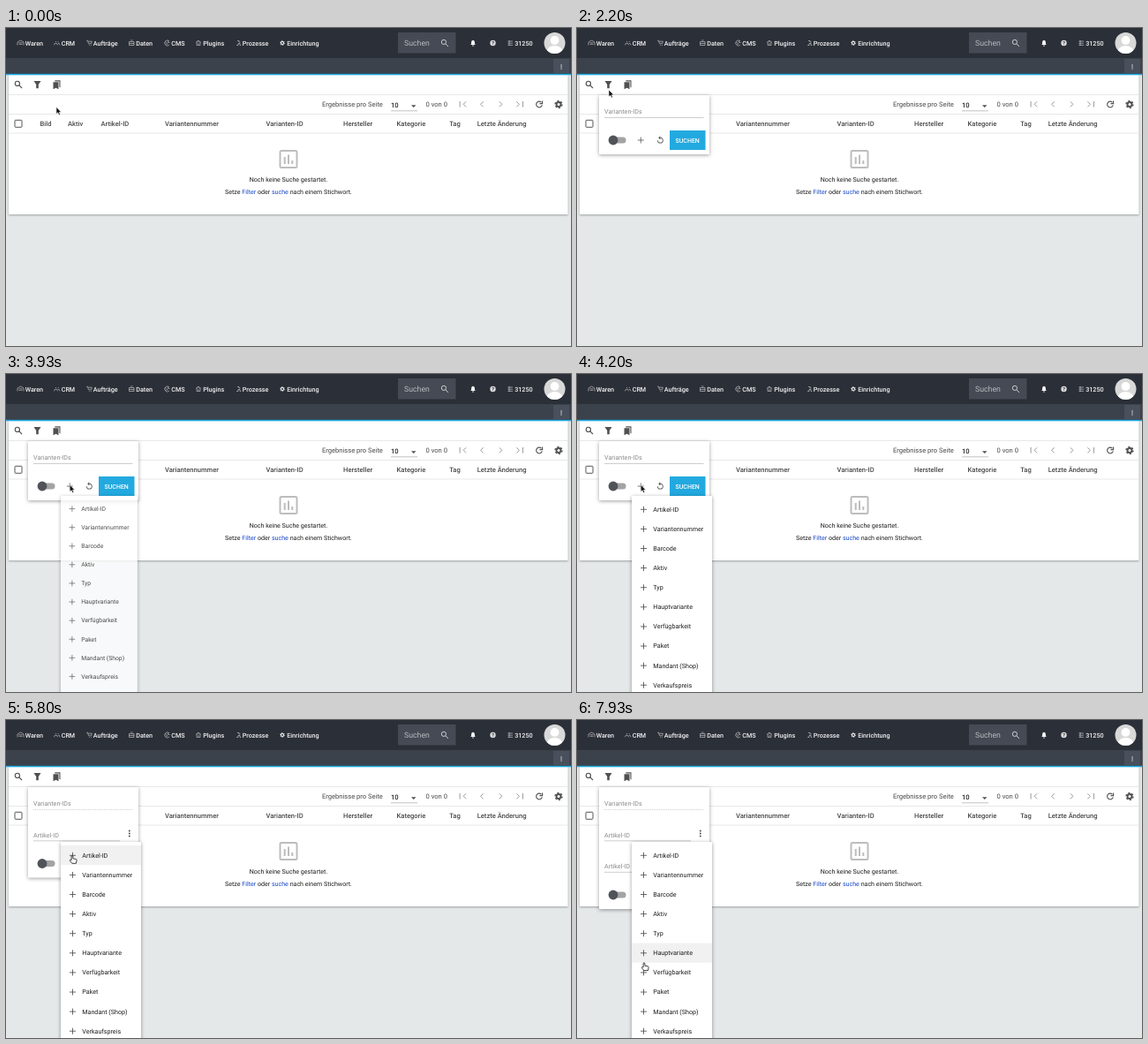
These frames come from a looping animation (640 by 360 pixels, 8000 ms). An HTML page:

```html
<!DOCTYPE html>
<html lang="de">
<head>
<meta charset="utf-8">
<style>
html, body { margin: 0; width: 100%; height: 100%; overflow: hidden; background: #e4e8e9; }
svg { display: block; width: 640px; height: 360px; font-family: Roboto, Arial, sans-serif; font-size: 7.15px; }
text { white-space: pre; text-rendering: geometricPrecision; }
.nav { font-size: 7.2px; font-weight: 500; fill: #f4f4f5; }
.head { font-size: 7.58px; font-weight: 500; fill: #484848; }
.label { fill: #8a8a8a; }
.line { fill: none; stroke: currentColor; }
.link { fill: #1646c8; }
.shadow { filter: drop-shadow(0 1px 2px rgba(0, 0, 0, .38)); }
</style>
</head>
<body>
<svg viewBox="0 0 640 360">
  <defs>
    <g id="search" class="line"><circle cx="-1.1" cy="-1.1" r="2.6"/><path d="M.9 .9L4 4"/></g>
    <path id="plus" class="line" d="M-3.5 0H3.5M0-3.5V3.5" stroke-width=".8"/>
    <g id="dots" fill="currentColor"><circle cy="-3" r=".9"/><circle r=".9"/><circle cy="3" r=".9"/></g>
    <g id="gear" class="line"><circle r="2.5" stroke-width="1.9"/><circle r="4" stroke-width="1.3" stroke-dasharray="2.09 2.09"/></g>
    <path id="turn" class="line" d="M2.4-2.4A3.4 3.4 0 1 0 3.3 .9M3.6-4V-.9H.5"/>
    <path id="chevron" class="line" d="M1.6-3L-1.4 0L1.6 3"/>
    <path id="end" class="line" d="M3.6-3L.6 0L3.6 3M-3.4-3.3V3.3"/>
  </defs>

  <!-- top bars -->
  <rect width="640" height="34" fill="#2b2f37"/>
  <rect y="34" width="640" height="18" fill="#3c424c"/>
  <rect x="620" y="35" width="18" height="16" fill="#4a505b"/>
  <use href="#dots" transform="translate(629 44) scale(.7)" color="#fff"/>
  <g id="nav"></g>
  <g color="#fff" class="line" stroke-width=".6" opacity=".8">
    <path d="M13 19.5V16L16.5 14L20 16V19.5M14.7 16.8H18.5M14.7 18.4H18.5"/>
    <path d="M54.5 19.3Q54.5 17.2 56.5 17.2T58.5 19.3M59 17.2Q61 17.2 61 19.3M56.5 15V16M59.2 15V16"/>
    <path d="M91 14.2H92.4L93.5 17.8H96.500L97.300 15.2H93M94 19.6H94.8M96 19.6H96.800"/>
    <path d="M139.5 19.5V15.5H145V19.5ZM139.5 17.5H145M141 14H143.5"/>
    <path d="M185 15A3 3 0 1 0 185 19M180.500 16Q183.500 17 182 19M183.500 14.5V16.5H185.5"/>
    <path d="M215 16H217V14.5H218.8V16H221M216 16.5V19.5H220V16.5M217 18H219"/>
    <path d="M262 14.5H264V16H265.500M261 19.5H263V17.5H265V19.5H266.300"/>
    <path d="M568.5 15H574M568.5 17.2H574M568.5 19.4H574M570 14V20"/>
  </g>
  <use href="#gear" transform="translate(313 17) scale(.62)" color="#e8e8e8"/>
  <rect x="444" y="5" width="65.500" height="23.500" fill="#454a54"/>
  <text x="451" y="20" font-size="8.75" fill="#b8bbc0">Suchen</text>
  <use href="#search" transform="translate(497 17)" color="#c8cace" stroke-width="1"/>
  <path d="M526.300 19H531.700L530.900 17.800V16Q530.900 13.900 529 13.700Q527.100 13.900 527.100 16V17.800ZM528.200 19.600H529.800V20.400H528.200Z" fill="#fff"/>
  <circle cx="551.500" cy="17" r="3.200" fill="#dcdcde"/>
  <text x="551.500" y="19" text-anchor="middle" font-size="5.500" font-weight="700" fill="#2b2f37">?</text>
  <clipPath id="disc"><circle cx="621.500" cy="17" r="12"/></clipPath>
  <g clip-path="url(#disc)">
    <rect x="609" y="5" width="25" height="25" fill="#d8d8d8"/>
    <circle cx="621.500" cy="14" r="4.900" fill="#fff"/>
    <ellipse cx="621.500" cy="27" rx="9" ry="7" fill="#fff"/>
  </g>

  <!-- result card -->
  <rect x="3" y="53" width="633.500" height="158" fill="#fff" style="filter: drop-shadow(0 1px 1px rgba(0,0,0,.3))"/>
  <rect y="51.800" width="640" height="1.500" fill="#1ba8e0"/>
  <path d="M3 75.500H636.500M3 97.500H636.500M3 119H636.500" class="line" color="#e2e2e2" stroke-width=".8"/>
  <g color="#505050" fill="#505050">
    <use href="#search" x="14" y="64" stroke-width="1.100"/>
    <path d="M31.500 60H39.500L36.800 64V68.300H34.200V64Z"/>
    <path d="M53.500 61.300H59.500V69.300L56.500 67.800L53.500 69.300ZM55.300 59.300H61.500V67.500L60.400 66.800V60.400H55.300Z"/>
    <use href="#turn" x="604" y="86.500" stroke-width="1.100"/>
    <use href="#gear" x="626" y="86.500"/>
    <path d="M459 87.300H464.500L461.750 90Z"/>
  </g>
  <path d="M436 93.800H466" class="line" color="#aaa" stroke-width=".7"/>
  <g color="#999" stroke-width="1">
    <use href="#end" x="517.500" y="86.300"/>
    <use href="#chevron" x="539" y="86.300"/>
    <use href="#chevron" transform="translate(560.500 86.300) scale(-1 1)"/>
    <use href="#end" transform="translate(582 86.300) scale(-1 1)"/>
  </g>
  <g class="head" style="font-weight:400">
    <text x="358" y="89">Ergebnisse pro Seite</text>
    <text x="436" y="89.700" font-weight="500" fill="#222">10</text>
    <text x="475.500" y="89">0 von 0</text>
  </g>
  <rect x="10" y="104.300" width="8" height="8" rx=".8" class="line" color="#555"/>
  <g id="head"></g>
  <g class="line" color="#bdbdbd" stroke-width="2">
    <rect x="310.500" y="139" width="19" height="19" rx="1.500"/>
    <path d="M315.700 146V154M320 143.500V154M324.300 150V154"/>
  </g>
  <g text-anchor="middle" fill="#1c1c1c" font-size="7.100">
    <text x="320" y="174">Noch keine Suche gestartet.</text>
    <text x="320" y="188.400">Setze <tspan class="link">Filter</tspan> oder <tspan class="link">suche</tspan> nach einem Stichwort.</text>
  </g>

  <g id="tip">
    <rect x="24" y="33" width="23" height="15" rx="1" fill="#24272d"/>
    <text x="35.500" y="43" text-anchor="middle" font-size="6.600" fill="#fff">Filter</text>
  </g>

  <!-- filter panel -->
  <g id="panel">
    <rect id="sheet" x="25" y="76" width="125" height="67" rx="1" fill="#fff" class="shadow"/>
    <text x="31" y="97.300" class="label">Varianten-IDs</text>
    <path id="idLine" d="M31 101.500H143.500" class="line" color="#c0c0c0" stroke-width=".8"/>
    <g id="fields"></g>
    <g id="actions">
      <rect x="38" y="123.500" width="17.500" height="7" rx="3.500" fill="#a3a3a3"/>
      <circle cx="41" cy="127" r="5.400" fill="#505359"/>
      <use href="#plus" x="72.300" y="127" color="#555"/>
      <path d="M12 5V1L7 6l5 5V7a6 6 0 1 1-6 6H4a8 8 0 1 0 8-8z" transform="translate(89.300 121.800) scale(.42)" fill="#505050"/>
      <rect x="105" y="116" width="40.500" height="22" fill="#22a9df"/>
      <text x="125.200" y="129.600" text-anchor="middle" font-size="7" font-weight="500" fill="#fff">SUCHEN</text>
    </g>
  </g>

  <g id="menu">
    <rect x="62" y="138" width="91" height="240" fill="#fff" class="shadow"/>
    <rect id="hover" x="62" width="91" height="22.100" fill="#f1f1f1"/>
    <g id="items"></g>
  </g>

  <path id="arrow" d="M0 0V7.800L1.800 6.200L3.100 9L4.400 8.400L3.200 5.700H5.500Z" fill="#111" stroke="#fff" stroke-width=".5"/>
  <path id="hand" d="M-.9 5.500V.7Q0-.4 .9 .7V3.600L4.300 4.200Q5.200 4.500 5.100 5.600L4.400 9H-.2L-2.700 5.900Q-2.600 4.700-1.600 5Z" fill="#fff" stroke="#111" stroke-width=".8" stroke-linejoin="round"/>
</svg>
<script>
const $ = id => document.getElementById(id);
const LOOP = 8000, STEP = 200 / 3, ROW = 22.1, TOP = 142, GROW = 35.5;

const labels = (id, cls, y, list) => {
  $(id).innerHTML = list.map(([x, s]) => `<text class="${cls}" x="${x}" y="${y}">${s}</text>`).join("");
};
labels("nav", "nav", 19.5, [[21.7, "Waren"], [62.7, "CRM"], [98.7, "Aufträge"], [147.2, "Daten"], [187.2, "CMS"],
  [223.2, "Plugins"], [267.7, "Prozesse"], [318.2, "Einrichtung"], [576.2, "31250"]]);
labels("head", "head", 110.8, [[38.5, "Bild"], [70, "Aktiv"], [107.5, "Artikel-ID"], [180, "Variantennummer"],
  [294.5, "Varianten-ID"], [382, "Hersteller"], [442.5, "Kategorie"], [502.3, "Tag"], [533.7, "Letzte Änderung"]]);

$("items").innerHTML = ["Artikel-ID", "Variantennummer", "Barcode", "Aktiv", "Typ", "Hauptvariante",
  "Verfügbarkeit", "Paket", "Mandant (Shop)", "Verkaufspreis"].map((s, i) => {
  const y = 153.3 + i * ROW;
  return `<use href="#plus" x="75.500" y="${y}" color="#444"/><text x="86.300" y="${y + 2.4}" fill="#1c1c1c">${s}</text>`;
}).join("");

$("fields").innerHTML = [0, 1].map(i => `<g transform="translate(0 ${i * GROW})">
  <text x="31" y="132.500" class="label">Artikel-ID</text>
  <path d="M31 136.800H129" class="line" color="#c0c0c0" stroke-width=".8"/>
  <use href="#dots" x="139.800" y="128.500" color="#444"/></g>`).join("");

// cursor tip: time, x, y
const path = [[1000, 57, 89.5], [1470, 37.5, 73.5], [1600, 36, 71.8], [1800, 36, 70], [2665, 36, 70],
  [3000, 62, 92], [3330, 71, 114.3], [3530, 72.3, 125.5], [4665, 72.3, 125.5], [5070, 75, 153.3],
  [7200, 75, 153.3], [7270, 74.6, 157.3], [7930, 76, 274.4], [8000, 76, 278]];

const ramp = (t, from, dur) => {
  const k = Math.min(1, Math.max(0, (t - from) / dur));
  return 1 - (1 - k) ** 2;
};

function cursor(t) {
  const i = path.findIndex(p => p[0] > t);
  if (i <= 0) return path[0].slice(1);
  const [t0, x0, y0] = path[i - 1], [t1, x1, y1] = path[i], k = (t - t0) / (t1 - t0);
  return [x0 + (x1 - x0) * k, y0 + (y1 - y0) * k];
}

function pop(id, k, x, y) {
  const s = .8 + .2 * k;
  $(id).setAttribute("opacity", k);
  $(id).setAttribute("transform", `translate(${x * (1 - s)} ${y * (1 - s)}) scale(${s})`);
}

function draw(now) {
  const t = Math.floor((now % LOOP) / STEP + .05) * STEP + 1;
  const [x, y] = cursor(t);
  const pointing = (t > 1330 && t < 2130) || (t > 3595 && t < 3865) || (t > 4665 && y > TOP);
  $("arrow").setAttribute("visibility", pointing ? "hidden" : "visible");
  $("hand").setAttribute("visibility", pointing ? "visible" : "hidden");
  for (const id of ["arrow", "hand"]) $(id).setAttribute("transform", `translate(${x} ${y})`);

  $("tip").setAttribute("opacity", ramp(t, 1400, 150) * (1 - ramp(t, 1990, 130)));
  pop("panel", ramp(t, 1960, 200), 25, 76);
  pop("menu", ramp(t, 3830, 200), 62, 138);

  const first = ramp(t, 5420, 130), second = ramp(t, 6350, 130), shift = GROW * (first + second);
  $("sheet").setAttribute("height", 67 + shift);
  $("actions").setAttribute("transform", `translate(0 ${shift})`);
  [first, second].forEach((k, i) => $("fields").children[i].setAttribute("opacity", k));
  $("idLine").setAttribute("stroke-dasharray", first ? "1 1" : "none");

  // the highlight trails the cursor by one step
  const row = Math.floor((cursor(t - STEP)[1] - TOP) / ROW);
  $("hover").setAttribute("y", TOP + ROW * Math.max(0, row));
  $("hover").setAttribute("opacity", ramp(t, 5420, 200));
}

const start = performance.now();
(function tick() {
  draw(performance.now() - start);
  requestAnimationFrame(tick);
})();
</script>
</body>
</html>
```
